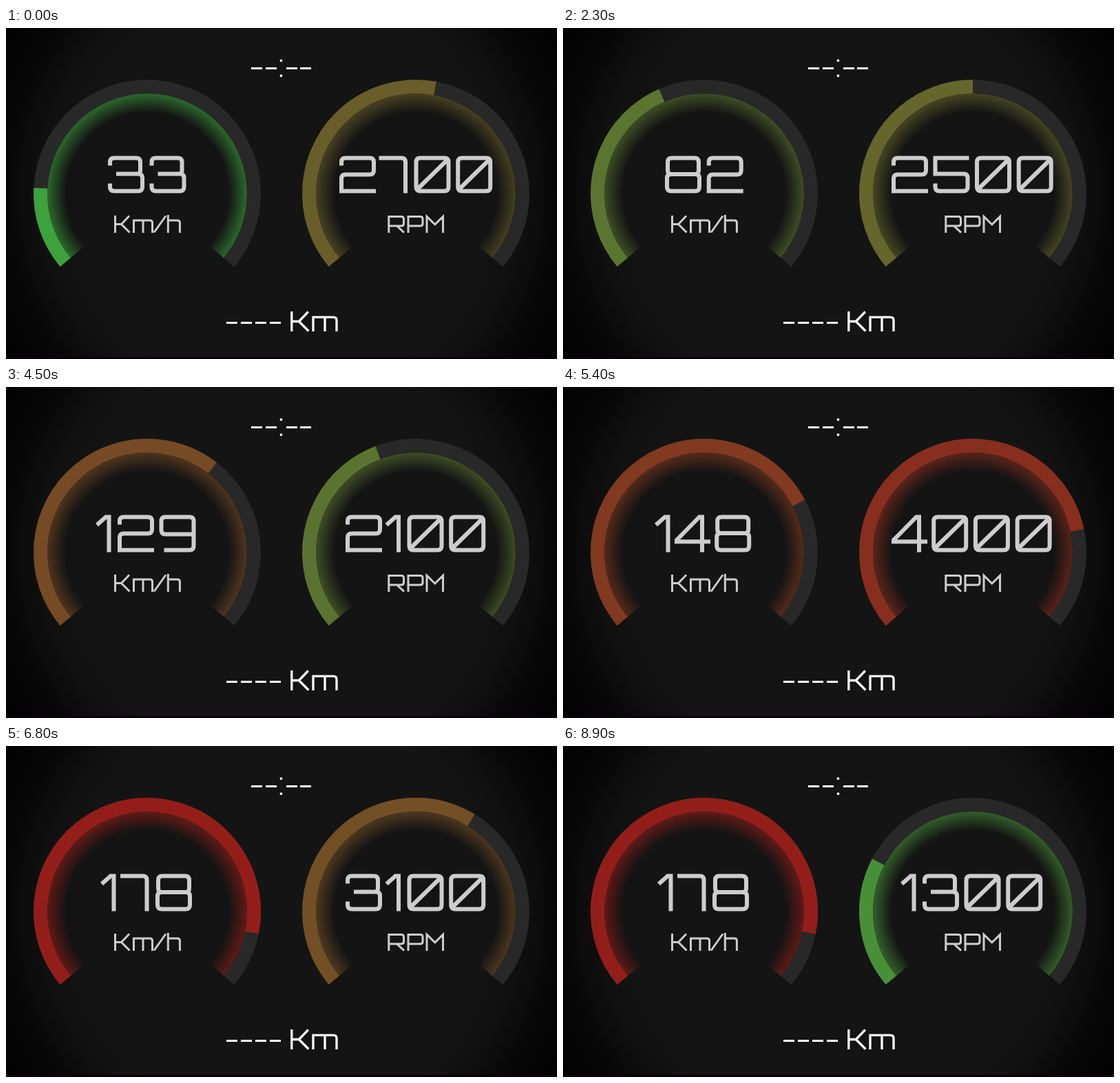
Recreate the animation shown at these times as an HTML page with a canvas. Size 800 by 480 pixels, loop 9 s.

```html
<!DOCTYPE html>
<html lang="en">
<head>
<meta charset="utf-8">
<title>Dashboard</title>
<style>
html, body { margin: 0; width: 100%; height: 100%; overflow: hidden; background: #000; }
canvas { display: block; }
</style>
</head>
<body>
<canvas id="stage" width="800" height="480" role="img" aria-label="Speed in Km/h and engine RPM"></canvas>
<script>
const ctx = document.getElementById('stage').getContext('2d');
const LOOP = 9000, STEP = 100;
const RAD = Math.PI / 180;
const START = 140 * RAD, SPAN = 260 * RAD;
const LOW = [41, 191, 68], HIGH = [160, 10, 20];
const GREY = '#cdcdcd', WHITE = '#fff';

// Wide squared digits: [advance, centre-line path in a 47 by 48 box]
const DIGITS = [
  [60.7, 'M6 0H41Q47 0 47 6V42Q47 48 41 48H6Q0 48 0 42V6Q0 0 6 0ZM2 45L45 3'],
  [29, 'M-4 11.5L9 0H13.5V51'],
  [60.5, 'M0 11V6Q0 0 6 0H41Q47 0 47 6V18Q47 24 41 24H6Q0 24 0 30V48H50'],
  [60.5, 'M0 11V6Q0 0 6 0H38Q44 0 44 6V18Q44 23 40 23M9 23H41Q47 23 47 29V42Q47 48 41 48H6Q0 48 0 42V37'],
  [55.2, 'M46 35.8H-3V33.5L30 0H34V51'],
  [60.5, 'M49 0H0V23H41Q47 23 47 29V42Q47 48 41 48H6Q0 48 0 42V37'],
  [60.7, 'M42 0H6Q0 0 0 6V42Q0 48 6 48H41Q47 48 47 42V29Q47 23 41 23H0'],
  [48, 'M-6 0H26.5Q32.5 0 32.5 6V51'],
  [60.7, 'M7 0H40Q46 0 46 6V18Q46 23.5 41 23.5Q47 23.5 47 29V42Q47 48 41 48H6Q0 48 0 42V29Q0 23.5 6 23.5Q1 23.5 1 18V6Q1 0 7 0ZM6 23.5H41'],
  [60.7, 'M47 25H6Q0 25 0 19V6Q0 0 6 0H41Q47 0 47 6V42Q47 48 41 48H4']
].map(([advance, d]) => ({ advance, path: new Path2D(d) }));

// Lettering in stage coordinates
const KMH = new Path2D(
  'M158.5 272V297M158.5 284.5H167.5L179 272.5M167.5 284.5L179.5 296.5' +
  'M185.5 297V279H209Q212.5 279 212.5 282.5V297M199 279V297' +
  'M215 296.5L232 272.5' +
  'M235.3 271V297M235.3 279H249Q252.4 279 252.4 282.5V297');
const RPM = new Path2D(
  'M555.8 297V273.4H574Q577.5 273.4 577.5 277V283.5Q577.5 287 574 287H555.8M567.5 287L578 296.7' +
  'M584 297V273.4H601.5Q605 273.4 605 277V283.5Q605 287 601.5 287H584' +
  'M611 297V273.4L622.8 285L634.5 273.4V297');
const KM = new Path2D(
  'M414.8 411V440M414.8 425.5H425.3L438.8 411.5M425.3 425.5L439.3 439.5' +
  'M446 440V419.3H475.5Q480 419.3 480 423.8V440M463 419.3V440');

const fold = (x, max) => {
  const r = x % (2 * max);
  return r > max ? 2 * max - r : r;
};

const shade = (k, alpha) =>
  `rgba(${LOW.map((c, i) => Math.round(c + (HIGH[i] - c) * k)).join()},${alpha})`;

function stroke(path, width, color) {
  ctx.lineWidth = width;
  ctx.strokeStyle = color;
  ctx.stroke(path);
}

function band(cx, radius, width, from, to, style) {
  ctx.beginPath();
  ctx.arc(cx, 240, radius, from, to);
  ctx.lineWidth = width;
  ctx.strokeStyle = style;
  ctx.stroke();
}

function number(value, cx) {
  const glyphs = [...String(value)].map(c => DIGITS[c]);
  let x = Math.floor(cx - glyphs.reduce((sum, g) => sum + g.advance, 0) / 2);
  for (const g of glyphs) {
    ctx.save();
    ctx.translate(x + 7, 188.5);
    stroke(g.path, 6, GREY);
    ctx.restore();
    x += g.advance;
  }
}

function gauge(cx, value, max) {
  const k = value / max;
  const glow = ctx.createRadialGradient(cx, 240, 118, cx, 240, 145);
  glow.addColorStop(0, shade(k, 0));
  glow.addColorStop(1, shade(k, 0.6));
  band(cx, 131.5, 27, START, START + SPAN, glow);
  band(cx, 155, 20, START, START + SPAN, '#282828');
  if (k > 0) band(cx, 155, 20, START, START + SPAN * k, shade(k, 1));
  number(value, cx);
}

function background() {
  const g = ctx.createRadialGradient(400, 240, 300, 400, 240, 466);
  g.addColorStop(0, '#141414');
  g.addColorStop(0.3, '#101010');
  g.addColorStop(0.6, '#070707');
  g.addColorStop(1, '#020202');
  ctx.fillStyle = g;
  ctx.fillRect(0, 0, 800, 480);
  ctx.fillStyle = '#070308';
  ctx.fillRect(0, 477, 800, 3);
}

function labels() {
  stroke(KMH, 3, GREY);
  stroke(RPM, 3, GREY);
  stroke(KM, 3.3, WHITE);
  ctx.fillStyle = WHITE;
  for (const x of [356, 377, 407, 427]) ctx.fillRect(x, 57, 16, 3);
  for (const y of [45.6, 67.6]) ctx.fillRect(397.8, y, 3.3, 3.3);
  for (let i = 0; i < 4; i++) ctx.fillRect(320 + 21 * i, 426, 16, 3);
}

function draw() {
  const n = Math.floor((performance.now() % LOOP) / STEP);
  const speed = Math.round(fold(33.4 + 2.12 * n, 200));
  const revs = Math.round(fold(2700 + 209 * n, 5000) / 100) * 100;
  background();
  gauge(205, speed, 200);
  gauge(595, revs, 5000);
  labels();
  requestAnimationFrame(draw);
}
draw();
</script>
</body>
</html>
```
